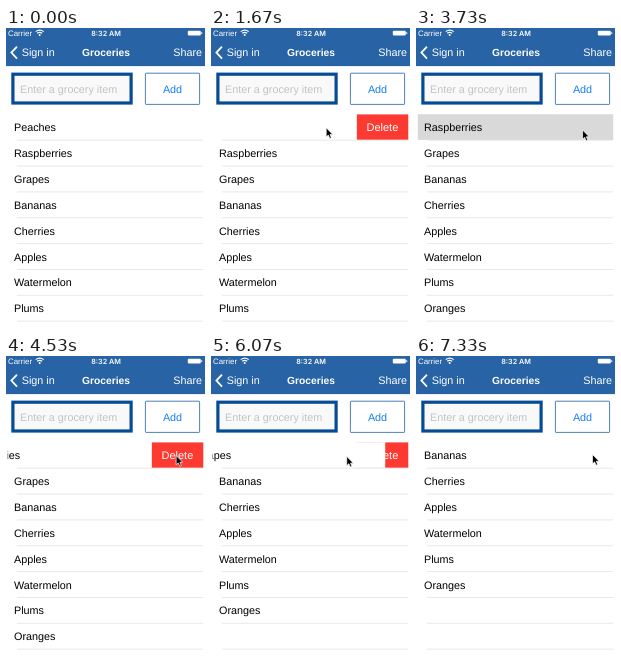
These frames come from a looping animation (199 px wide and 300 px high, 7.59 s). An HTML page:

```html
<!DOCTYPE html>
<html lang="en">
<head>
<meta charset="utf-8">
<title>Grocery list</title>
<style>
html, body { margin: 0; width: 100%; height: 100%; overflow: hidden; background: #fff; }
svg {
  display: block; width: 199px; height: 300px;
  font: 10.8px "Liberation Sans", Arial, sans-serif;
  text-rendering: geometricPrecision;
}
.bar { fill: #fff; }
.status { font-size: 7.9px; }
.clock { font: 600 7.2px Inter, sans-serif; }
.title { font-weight: 700; font-size: 10.3px; }
.mid { text-anchor: middle; }
.lines { stroke: #dedee0; stroke-width: .7; }
</style>
</head>
<body>
<svg viewBox="0 0 199 300">
  <defs>
    <clipPath id="page"><rect x="1.6" y="80" width="195.8" height="220"/></clipPath>
  </defs>
  <rect width="199" height="300" fill="#fff"/>
  <rect width="199" height="38.1" fill="#2763a5"/>
  <g class="bar">
    <text class="status" x="2" y="7.7">Carrier</text>
    <text class="clock mid" x="100" y="7.7">8:32 AM</text>
    <g fill="none" stroke="#fff" stroke-width="1.1">
      <path d="M29.7 3.6Q33.7 .6 37.7 3.6M31.2 5.3Q33.7 3.5 36.2 5.3"/>
      <path d="M11 18.6L5.4 24.6 11 30.6" stroke-width="1.8"/>
    </g>
    <circle cx="33.7" cy="6.9" r="1"/>
    <rect x="181.8" y="2.7" width="13" height="4.8" rx="1"/>
    <rect x="195.2" y="4.2" width="1" height="1.8"/>
    <text x="15.7" y="28.4">Sign in</text>
    <text class="title mid" x="100" y="28.4">Groceries</text>
    <text x="196" y="28.4" text-anchor="end">Share</text>
  </g>
  <rect x="6.9" y="46.2" width="118.2" height="28.8" fill="#f9f9f9" stroke="#054b95" stroke-width="3.2"/>
  <text x="14" y="65" fill="#c3c3c7">Enter a grocery item</text>
  <rect x="139.4" y="45.2" width="54.2" height="31.2" rx=".6" fill="#fff" stroke="#3a73b2" stroke-width=".9"/>
  <text class="mid" x="166.5" y="65" fill="#1480f0">Add</text>
  <g clip-path="url(#page)">
    <g id="del">
      <rect x="145.7" y="86.4" width="52" height="25.4" fill="#fd3a31"/>
      <text class="mid" x="171.4" y="103.3" fill="#fff" font-size="11">Delete</text>
    </g>
    <rect id="cover" y="86.2" width="196" height="25.7" fill="#fff"/>
    <g id="lines" class="lines"></g>
    <g id="items"></g>
  </g>
  <path id="cursor" d="M0 0V9.3L2.1 7.4 3.6 10.7 5.2 10 3.8 6.8H6.6Z" fill="#000" stroke="#fff" stroke-width=".7"/>
</svg>
<script>
const LOOP = 7590, FPS = 15, PITCH = 25.85, OPEN = 52, ENTER = 12;
const names = ["Peaches", "Raspberries", "Grapes", "Bananas", "Cherries",
  "Apples", "Watermelon", "Plums", "Oranges"];

// One swipe and delete each; times in ticks of 1 / FPS.
const rounds = [
  { press: 20, remove: 43, from: [188.5, 99.5], to: [168.5, 100.6] },
  { press: 55, remove: 78, from: [172.5, 102.2], to: [176.5, 99.5] },
  { press: 89, remove: 110, from: [173.5, 101.5], to: [176.5, 98.5] }
];
const entry = [185, 105], far = [115.2, 99.7];

const $ = id => document.getElementById(id);
const del = $("del"), cover = $("cover"), cursor = $("cursor");

function add(parent, tag, attrs, text = "") {
  const el = document.createElementNS("http://www.w3.org/2000/svg", tag);
  for (const key in attrs) el.setAttribute(key, attrs[key]);
  el.textContent = text;
  return parent.appendChild(el);
}

for (let i = 0; i < 8; i++) {
  const y = 112.2 + i * PITCH;
  add($("lines"), "line", { x1: 11, x2: 197.5, y1: y, y2: y });
}
const items = names.map(name => add($("items"), "text", { x: 8 }, name));

function glide(a, b, k) {
  k = Math.min(1, Math.max(0, k));
  k *= k * (3 - 2 * k);
  return a.map((v, i) => v + (b[i] - v) * k);
}

// Approach the row, swipe left, then go back to the button.
function pointer(tick, gone) {
  const last = rounds[gone - 1], round = rounds[gone];
  if (!round) return last.to;
  const age = tick - round.press;
  if (age < 0) {
    return glide(last ? last.to : entry, round.from, (tick - (last ? last.remove : ENTER)) / 6);
  }
  return age < 5
    ? glide(round.from, far, (age - 0.5) / 2.5)
    : glide(far, round.to, (age - 5) / 10);
}

function draw(now) {
  const tick = Math.floor((now % LOOP) * FPS / 1000 + 0.06);
  const gone = rounds.filter(r => tick >= r.remove).length;
  const age = gone < rounds.length ? tick - rounds[gone].press : -1;
  const [x, y] = pointer(tick, gone);
  // The row follows the pointer, then snaps open.
  const shift = age < 0 ? 0 : age > 3 ? OPEN : Math.max(0, 159 - x);
  const pressed = age === 0 || age === 1;

  items.forEach((el, i) => {
    const row = i - gone;
    el.style.display = row < 0 ? "none" : "";
    el.setAttribute("x", row ? 8 : 8 - shift);
    el.setAttribute("y", 103.3 + row * PITCH);
  });
  del.style.display = shift ? "" : "none";
  cover.setAttribute("x", 1.5 - shift);
  cover.setAttribute("fill", pressed ? "#d9d9d9" : "#fff");
  cursor.style.display = tick < ENTER ? "none" : "";
  cursor.setAttribute("transform", `translate(${x} ${y})`);
}

const start = performance.now();
function loop() {
  draw(performance.now() - start);
  requestAnimationFrame(loop);
}
loop();
</script>
</body>
</html>
```
